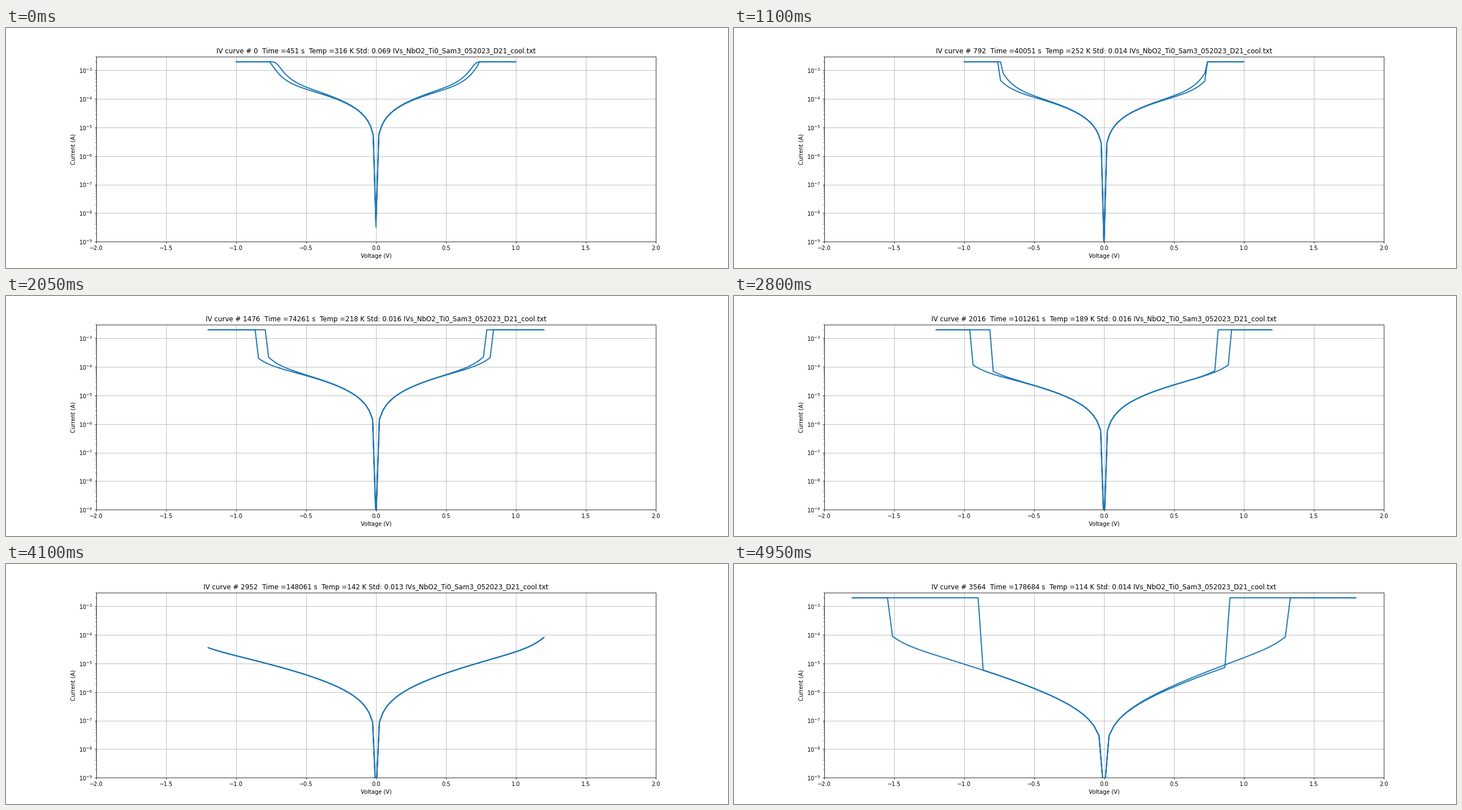
A matplotlib script for the animation above (5000 ms loop, 1280 by 427 pixels).

```python
import numpy as np
import matplotlib.pyplot as plt
from matplotlib.animation import FuncAnimation

WIDTH, HEIGHT = 1280, 427
DPI = WIDTH / 18
FRAMES, INTERVAL = 100, 50
STRIDE = 36            # sweeps skipped between pictures
LIMIT = 2e-3           # compliance current (A)
FILE = "IVs_NbO2_Ti0_Sam3_052023_D21_cool.txt"


def threshold(i, side):
    """Voltage that switches the device on, for the +1 or -1 side."""
    volts = [.735, .905, 1.075, 1.325] if side > 0 else [.75, .95, 1.14, 1.545]
    return np.interp(i, [22, 56, 67, 99], volts)


def branch(i, v, side, rising, switching):
    """Current magnitude over |V| on the rising or falling ramp."""
    x = i / (FRAMES - 1)
    log_cond = -3.553 - .989 * x - 1.558 * x**2
    slope = (.8 + .35 * x + .9 * x**2 + .73 * x**12) * (1 + .09 * x * side)
    if rising:
        switch = threshold(i, side)
        runaway = switch - .04 + .26 * x - .19 * x**2
    else:
        switch = max(.73, .692 + .19 * x)
        runaway = switch - .06 + .5 * x**2
        slope += .25 * (1 - x)**2 - (.25 * x**2 if side > 0 else 0)
    heat = np.exp(np.minimum((v - runaway) / (.08 + .02 * x), 1.5))
    amps = v * 10**log_cond * np.exp(slope * (v - .02) + heat)
    amps /= (1 + (amps / LIMIT)**4)**.25
    return np.where(v >= switch, LIMIT, amps) if switching else amps


def sweep(i):
    n, x = i * STRIDE, i / (FRAMES - 1)
    vmax = 1.0 if n < 1000 else 1.2 if n < 3000 else 1.8
    v = np.linspace(0, vmax, 51)
    noise = np.random.default_rng(i).uniform(0, .4, 3)
    zeros = 10**(-8.5 - 3.8 * x + 2.5 * x**2 + noise)
    volts, amps = [], []
    for k, side in enumerate((1, -1)):
        on = threshold(i, side) < vmax - v[1]
        rise = branch(i, v, side, True, on)
        fall = branch(i, v, side, not on, on)[::-1]
        rise[0], fall[-1] = zeros[k], zeros[k + 1]
        volts += [side * v, side * v[::-1]]
        amps += [rise, fall]
    return np.concatenate(volts), np.concatenate(amps)


def caption(i):
    n, x = i * STRIDE, i / (FRAMES - 1)
    t = 451 + 50 * n + 10 * (n >= 1000) + 23 * (n >= 3000)
    settle = np.exp(-(t - 451) / 6600)
    temp = np.interp(i, [0, 41, 56, 82, 99], [291, 218.4, 189, 142, 114]) + 25 * settle
    std = .0145 + .0015 * np.cos(2 * np.pi * (x - .48) / .7) + .055 * settle
    return f"IV curve # {n}  Time ={t} s  Temp ={temp:.0f} K Std: {std:.3f} {FILE}"


# The tiny offset keeps the pixel size from rounding down
fig, ax = plt.subplots(figsize=((WIDTH + 1e-6) / DPI, (HEIGHT + 1e-6) / DPI), dpi=DPI)
line, = ax.plot([], [], color="C0", lw=2)
ax.set_yscale("log")
ax.set_xlim(-2, 2)
ax.set_ylim(1e-9, 3e-3)
ax.set_xlabel("Voltage (V)")
ax.set_ylabel("Current (A)")
ax.grid(True)
title = ax.set_title("")


def update(i):
    line.set_data(*sweep(i))
    title.set_text(caption(i))
    return line, title


anim = FuncAnimation(fig, update, frames=FRAMES, interval=INTERVAL,
                     repeat=True, repeat_delay=0, blit=False)
plt.show()
```
